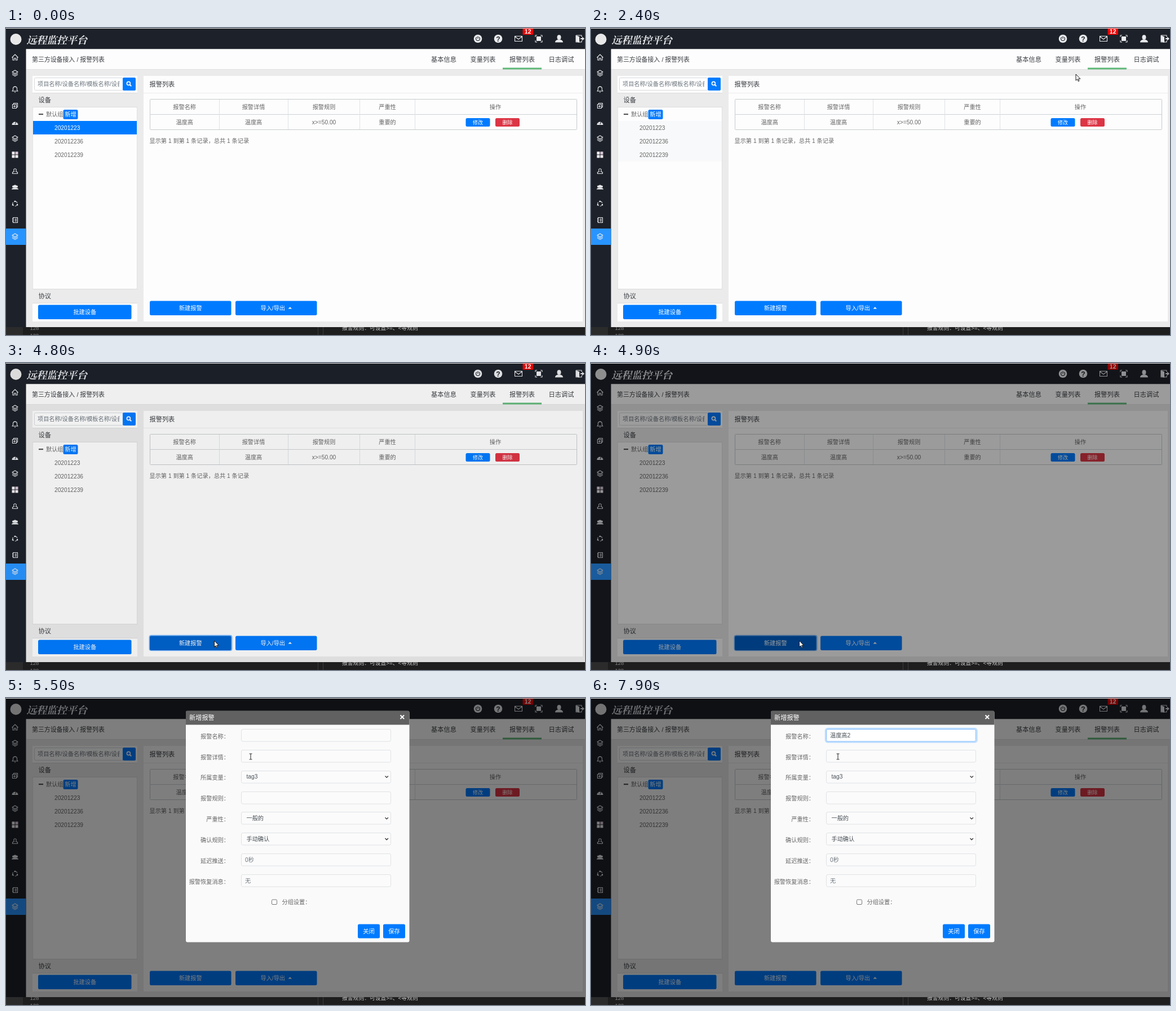
An HTML page that plays this animation: 1027 px wide and 545 px high, repeating every 8000 ms.

```html
<!DOCTYPE html>
<html lang="zh-CN">
<head>
<meta charset="utf-8">
<title>报警列表</title>
<style>
html, body { margin: 0; width: 100%; height: 100%; overflow: hidden; background: #1e1e1e; }
svg { display: block; width: 1027px; height: 545px; }
text { font-family: "Liberation Sans", "Noto Sans CJK SC", "Noto Sans CJK", sans-serif; white-space: pre; }
.brand { font-family: "Noto Serif CJK SC", "Noto Sans CJK SC", "Noto Sans CJK", serif; font-weight: 600; font-style: italic; }
.line { fill: none; stroke: #e9ebee; stroke-width: 1.1; stroke-linejoin: round; }
.solid { fill: #e9ebee; }
</style>
</head>
<body>
<svg id="stage" viewBox="0 0 1027 545" xmlns="http://www.w3.org/2000/svg"></svg>
<script>
const BLUE = '#007bff', GREY = '#666', DARK = '#3a3d42', EDGE = '#d5d9dd';

const rect = (x, y, w, h, fill, more = '') =>
  `<rect x="${x}" y="${y}" width="${w}" height="${h}" fill="${fill}" ${more}/>`;
const frame = (x, y, w, h, stroke = EDGE, rx = 2, fill = '#fff') =>
  rect(x + .5, y + .5, w - 1, h - 1, fill, `stroke="${stroke}" rx="${rx}"`);
// cy is the visual middle of the line
const text = (x, cy, s, { size = 10.2, fill = GREY, anchor = 'start', more = '' } = {}) =>
  `<text x="${x}" y="${cy + size * .37}" font-size="${size}" fill="${fill}" text-anchor="${anchor}" ${more}>${s}</text>`;
const button = (x, y, w, h, label, { size = 10.2, fill = BLUE, id = '', dx = 0 } = {}) =>
  rect(x, y, w, h, fill, `rx="2.5" ${id && `id="${id}"`}`) +
  text(x + w / 2 + dx, y + h / 2, label, { size, fill: '#fff', anchor: 'middle', more: 'font-weight="500"' });
const path = (d, cls = 'line', more = '') => `<path class="${cls}" d="${d}" ${more}/>`;
const at = (x, y, body, more = '') => `<g transform="translate(${x} ${y})" ${more}>${body}</g>`;

const layers = path('M-5-2L0-5 5-2 0 1ZM-5 .4L0 3.4 5 .4M-5 2.6L0 5.6 5 2.6');
const sideIcons = [
  [52, path('M-5.5 .5L0-5 5.5 .5M-4-1V5H-1.3V1.5H1.3V5H4V-1')],
  [80, layers],
  [109, path('M-5 3H5L3.5 1V-1.500C3.500-6-3.500-6-3.500-1.500V1ZM-1 5H1M0-5V-6')],
  [138, path('M-4.500-2.500H2.500V4.500H-4.500ZM-2.500-2.500V-4.500H4.500V2.500H2.500M-3 1H1M-1-1V3')],
  [168, path('M-5.500 4A5.500 5.500 0 1 1 5.500 4Z', 'solid') +
        path('M0 3L2-2M-3.500 1H-2.500M-2-2.500L-1.500-2M3 1H4', 'line', 'style="stroke:#1d2129"')],
  [196, layers],
  [225, rect(-5.5, -5.5, 5, 5, '#f5f0f4') + rect(.5, -5.5, 5, 5, '#d9c7d9') +
        rect(-5.5, .5, 5, 5, '#f5f0f4') + rect(.5, .5, 5, 5, '#f5f0f4')],
  [254, path('M-1.500 1C-5-6 5-6 1.500 1L4.500 2V4.500H-4.500V2Z')],
  [283, `<circle class="solid" cx="-3" cy="-1.500" r="2"/><circle class="solid" cx="3" cy="-1.500" r="2"/>
         <circle class="solid" cy="-2" r="2.600"/>` + path('M-6 3.500C-6-.5 6-.5 6 3.500Z', 'solid')],
  [312, '<circle class="line" r="4.200" stroke-dasharray="6.500 2.300"/>' +
        '<circle class="solid" cy="-4.200" r="1.300"/><circle class="solid" cx="-4" cy="2" r="1.300"/><circle class="solid" cx="4" cy="2" r="1.300"/>'],
  [341, path('M-3.500-4.500H4.500V4.500H-3.500ZM-5-2.500H-2.500M-5 0H-2.500M-5 2.500H-2.500M-.5-2H3M-.5 0H3M-.5 2H3')],
  [370, layers]
];

const topIcons = [
  [837, '<circle class="solid" r="7.300"/>' +
        path('M-2-2.800A3.500 3.500 0 1 0 2-2.800M0-4.500V0', 'line', 'style="stroke:#1d2129"')],
  [873, '<circle class="solid" r="7.300"/>' +
        text(0, .2, '?', { size: 12, fill: '#1d2129', anchor: 'middle', more: 'font-weight="700"' })],
  [909, path('M-6.500-4.500H6.500V4.500H-6.500ZM-6.500-4L0 1 6.500-4')],
  [945, rect(-4, -4, 8, 8, '#e9ebee') + path('M-6-3V-6H-3M3-6H6V-3M6 3V6H3M-3 6H-6V3')],
  [981, '<ellipse class="solid" cy="-2.500" rx="3.500" ry="4.300"/>' +
        path('M-7 6.500C-7 3-4 2.500-2 1.500H2C4 2.500 7 3 7 6.500Z', 'solid')],
  [1017, path('M-6-6H4V-3M4 3V6H-6V-6') + path('M-6-6L0-3.500V7L-6 5ZM2-1H5V-3.500L9 0 5 3.500V1H2Z', 'solid')]
];

function header() {
  const tabs = [[776.5, '基本信息'], [846, '变量列表'], [915.5, '报警列表'], [985, '日志调试']];
  return rect(0, 0, 1027, 1, '#e4e4e4') + rect(0, 1, 1027, 36.5, '#1d2129') +
    '<circle cx="17.500" cy="20" r="10" fill="#e8e8e8"/>' +
    text(36.5, 21, '远程监控平台', { size: 17.9, fill: '#e4e6e9', more: 'class="brand"' }) +
    topIcons.map(([x, body]) => at(x, 19, body)).join('') +
    rect(916.5, 1, 18.5, 11, '#f00000', 'rx="1"') +
    text(925.7, 6.5, '12', { size: 10.5, fill: '#fff', anchor: 'middle', more: 'font-weight="700"' }) +
    rect(35.5, 37.5, 992, 36, '#fdfdfd') + rect(35.5, 73, 992, 1, '#e2e2e2') +
    text(46, 55.5, '第三方设备接入', { size: 10.9, fill: DARK }) +
    text(125.5, 55.5, '/', { size: 10.9, fill: DARK }) +
    text(131.3, 55.5, '报警列表', { size: 10.9, fill: DARK }) +
    tabs.map(([x, s]) => text(x, 55.5, s, { size: 11.2, fill: DARK, anchor: 'middle' })).join('') +
    rect(881, 70.5, 69, 3, '#5fb878');
}

function sidebar() {
  return rect(0, 37, 35.5, 494, '#1d2129') + rect(0, 356, 35.5, 29, '#2894ff') +
    sideIcons.map(([y, body]) => at(16, y, body)).join('');
}

function devicePanel() {
  const names = ['20201223', '202012236', '202012239'];
  const section = (y, s) => rect(47, y, 186, 26, '#ebebeb') + rect(47, y, 186, 1, '#dcdcdc') +
    rect(47, y + 25, 186, 1, '#dcdcdc') + text(57.5, y + 13, s, { size: 11.2, fill: DARK });
  return rect(47, 85, 186, 436, '#fdfdfd') + rect(232, 115, 1, 374, '#e0e0e0') + rect(47, 115, 1, 374, '#e4e4e4') +
    frame(50, 88, 158, 23) +
    '<clipPath id="field"><rect x="54" y="89" width="147" height="21"/></clipPath>' +
    text(56, 99.7, '项目名称/设备名称/模板名称/设备', { fill: '#6c757d', more: 'clip-path="url(#field)"' }) +
    rect(207, 88, 23, 23, BLUE, 'rx="2"') +
    at(218, 99, '<circle cx="-.6" cy="-.6" r="3" fill="none" stroke="#fff" stroke-width="1.600"/><path d="M1.600 1.600L4.300 4.300" stroke="#fff" stroke-width="1.900"/>') +
    section(115, '设备') + section(463, '协议') +
    rect(58, 152, 8, 2.2, '#555') + text(71, 153.3, '默认组') +
    button(101.5, 145, 26, 17, '新增') +
    names.map((s, i) => rect(48, 165 + i * 23.9, 184, 23.9, '#f8f9fa', `id="row${i}"`) +
      text(86, 177.3 + i * 23.9, s, { more: `id="name${i}"` })).join('') +
    button(57, 491.5, 165.5, 25.5, '批建设备');
}

function alarmPanel() {
  const columns = [[316.7, '报警名称', '温度高'], [439, '报警详情', '温度高'],
    [564, '报警规则', 'x&gt;=50.00'], [676.5, '严重性', '重要的'], [868, '操作', '']];
  return rect(244, 85, 779, 436, '#fdfdfd') + rect(244, 115, 779, 1, '#ececec') +
    text(254.5, 100, '报警列表', { size: 11.2, fill: DARK }) +
    frame(255, 126, 758, 55, '#c6cacd', 1, '#fdfdfd') + rect(255, 153, 757, 1, '#ced2d6') +
    [378, 500, 627, 725].map(x => rect(x, 127, 1, 53, '#dee2e6')).join('') +
    columns.map(([x, a, b]) => text(x, 140, a, { anchor: 'middle' }) + text(x, 167, b, { anchor: 'middle' })).join('') +
    button(815.5, 160, 43, 15, '修改', { size: 9 }) +
    button(868, 160, 43, 15, '删除', { size: 9, fill: '#dc3545' }) +
    text(254.5, 200.5, '显示第 1 到第 1 条记录，总共 1 条记录') +
    rect(253.5, 482.8, 148, 28.4, '#80bdff', 'id="ring" rx="4"') +
    button(255, 484.5, 144.5, 25.5, '新建报警', { id: 'create' }) +
    button(407, 484.5, 144.5, 25.5, '导入/导出', { dx: -6 }) +
    '<path d="M500.500 498.500H507L503.750 495.200Z" fill="#fff"/>';
}

function editorStrip() {
  return '<clipPath id="strip"><rect y="531" width="1027" height="14"/></clipPath><g clip-path="url(#strip)">' +
    rect(0, 531, 1027, 14, '#1e1e1e') + rect(0, 531, 30, 14, '#2b2b2c') +
    rect(553, 531, 1, 14, '#3b3b3b') + rect(562, 531, 1, 14, '#3b3b3b') +
    text(42.5, 532, '128', { size: 9.5, fill: '#858585' }) + text(42.5, 545, '129', { size: 9.5, fill: '#858585' }) +
    text(596, 532, '报警规则：可设置&gt;=、&lt;等规则', { fill: '#c8c8c8', size: 9.8 }) + '</g>';
}

function dialog() {
  const fields = [['报警名称：'], ['报警详情：'], ['所属变量：', 'tag3', 1], ['报警规则：'],
    ['严重性：', '一般的', 1], ['确认规则：', '手动确认', 1], ['延迟推送：', '0秒'], ['报警恢复消息：', '无']];
  const row = ([label, value = '', select], i) => {
    const y = 66 + i * 36.85;
    return text(396, y + 2, label, { anchor: 'end' }) +
      frame(417, Math.round(y - 11), 266, 22.5, '#dfe2e6', 2.5, '#fbfbfb') +
      text(select ? 426.5 : 424, y, value, { fill: select ? '#495057' : '#6c757d' }) +
      (select ? `<path d="M672.500 ${y - 1.2}l2.700 2.700 2.700-2.700" fill="none" stroke="#333" stroke-width="1.300"/>` : '');
  };
  return rect(319, 23, 396.5, 410.5, '#fafafa', 'rx="3"') +
    '<path d="M319 47.500V25.500a3 3 0 0 1 3-3H712.500a3 3 0 0 1 3 3V47.500Z" fill="#616161"/>' +
    text(325, 34.5, '新增报警', { size: 11.2, fill: '#fff' }) +
    '<path d="M699.500 30.500l6.600 6.600m0-6.600l-6.600 6.600" stroke="#fff" stroke-width="2"/>' +
    fields.map(row).join('') +
    `<g id="focus">${rect(416, 54, 268.5, 24.5, 'none', 'rx="4" stroke="#bfdeff" stroke-width="2.500"')}` +
    `${frame(417, 55, 266, 22.5, '#80bdff', 2.5)}</g>` +
    text(424, 66, '温度高2', { fill: '#495057', more: 'id="typed"' }) +
    rect(424, 60, 1, 12, '#333', 'id="caret"') +
    frame(471, 357.5, 10, 9.5, '#767676', 1.5) + text(489.5, 362.5, '分组设置：') +
    button(624, 401.5, 39, 25, '关闭') + button(669, 401.5, 39, 25, '保存');
}

const cursors =
  '<path id="arrow" d="M0 0V11.200L2.600 8.800 4.300 12.700 6 12 4.300 8.200H7.900Z" fill="#fff" stroke="#000" stroke-width=".9"/>' +
  '<path id="hand" d="M-1.200 7V1Q0-1 1.200 1V5L6 6.200Q7 7 6.500 10L5.500 14H-.5L-4 9.500Q-4 7.500-2.500 8.200L-1.200 9.500Z" fill="#fff" stroke="#000" stroke-width=".9"/>' +
  '<path id="beam" d="M-2.500-5H-.6L0-4.500 .6-5H2.500M0-4.500V4.500M-2.500 5H-.6L0 4.500 .6 5H2.500" fill="none" stroke="#333" stroke-width="1.100"/>';

document.getElementById('stage').innerHTML =
  rect(0, 0, 1027, 531, '#ebebeb') + header() + sidebar() + devicePanel() + alarmPanel() + editorStrip() +
  rect(0, 1, 1027, 530, '#000', 'id="backdrop"') +
  `<clipPath id="view"><rect y="1" width="1027" height="530"/></clipPath>` +
  `<g clip-path="url(#view)"><g id="dialog">${dialog()}</g></g><g id="pointer">${cursors}</g>`;

const $ = id => document.getElementById(id);
const set = (id, attrs) => { for (const k in attrs) $(id).setAttribute(k, attrs[k]); };
const show = (id, on) => set(id, { visibility: on ? 'inherit' : 'hidden' });
const clamp = v => Math.min(1, Math.max(0, v));
const within = (t, a, b) => t >= a && t < b;

// time, x, y of the pointer tip
const route = [[300, 947, 71], [400, 805, 105], [500, 770, 125], [600, 742, 158], [700, 367, 220], [800, 200, 230],
  [900, 182, 200], [1000, 177, 180], [1600, 177, 180], [1800, 188, 178], [2000, 194, 176], [2100, 288, 162],
  [2300, 790, 94], [2400, 860, 82], [2600, 910, 62], [2800, 917, 53], [3300, 917, 53], [3500, 850, 120],
  [3800, 430, 445], [4000, 374, 489], [4100, 369.5, 493], [5000, 369.5, 493], [5200, 392, 340], [5400, 430, 122],
  [5500, 434, 104], [5800, 438, 67], [7700, 438, 67], [7900, 438, 104], [8000, 438, 104]];

function pointerAt(t) {
  const i = Math.max(1, route.findIndex(p => p[0] >= t));
  const [t0, x0, y0] = route[i - 1], [t1, x1, y1] = route[i];
  const k = clamp((t - t0) / (t1 - t0));
  return [x0 + (x1 - x0) * k, y0 + (y1 - y0) * k];
}

function render(t) {
  const selected = t < 1300;
  set('row0', { fill: selected ? BLUE : '#f8f9fa' });
  set('name0', { fill: selected ? '#fff' : GREY });
  show('row0', t < 3400);
  show('row1', within(t, 900, 3400));
  show('row2', within(t, 800, 3400));

  set('create', { fill: within(t, 4700, 5300) ? '#0062cc' : within(t, 4000, 4700) ? '#0069d9' : BLUE });
  show('ring', within(t, 4700, 5300));
  set('backdrop', { opacity: .5 * clamp((t - 4783) / 150) });

  const sinceOpen = t - 4967;
  const lift = 103 * (1 - clamp(sinceOpen / 300)) ** 1.7;
  set('dialog', { opacity: clamp(sinceOpen / 150), transform: `translate(0 ${-lift})` });
  show('dialog', sinceOpen > 0);

  const typed = t >= 7400;
  show('focus', t >= 5900);
  show('typed', typed);
  set('caret', { x: typed ? 460 : 424 });
  show('caret', within(t, 6000, 6500) || within(t, 7000, 7900));

  const [x, y] = pointerAt(t);
  const kind = t >= 5400 ? 'beam' : within(t, 800, 2100) || within(t, 2600, 3400) ? 'hand' : 'arrow';
  set('pointer', { transform: `translate(${x} ${y})` });
  show('pointer', t >= 300 && !within(t, 7400, 7800));
  for (const id of ['arrow', 'hand', 'beam']) show(id, id === kind);
}

const start = performance.now();
function tick() {
  const t = (performance.now() - start) % 8000;
  render(Math.floor(t / 100) * 100);
  requestAnimationFrame(tick);
}
tick();
</script>
</body>
</html>
```
